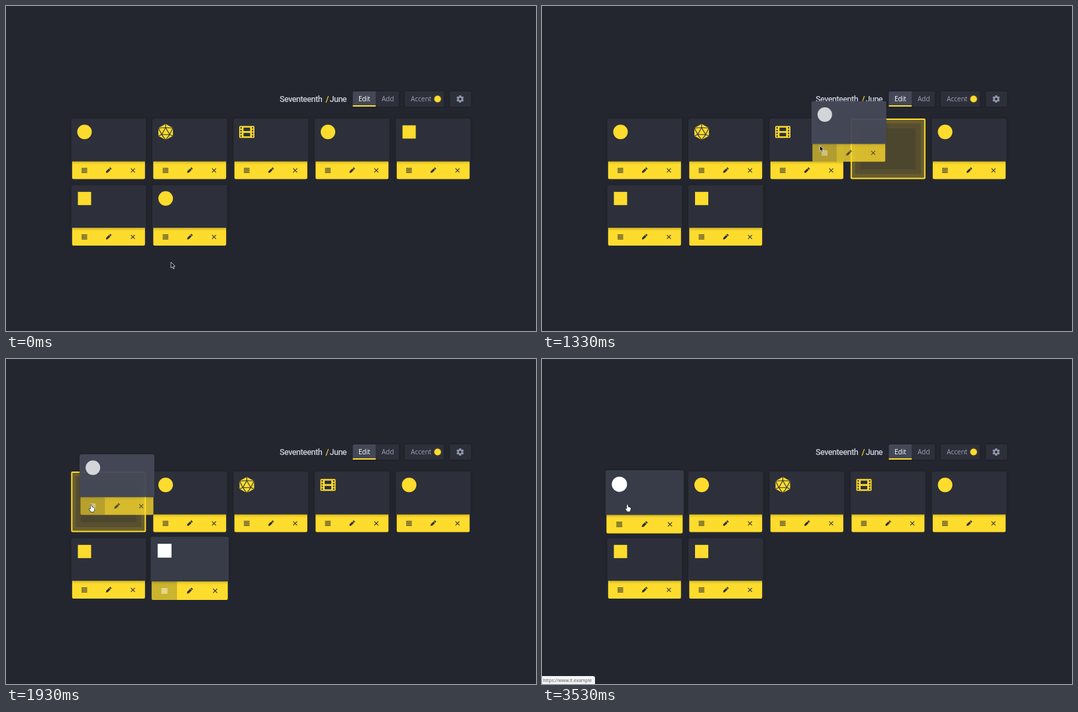
An HTML page with a canvas that plays this animation: 800x491 px, repeating every 3.59 s.

```html
<!DOCTYPE html>
<html lang="en">
<head>
<meta charset="utf-8">
<title>Start page tiles</title>
<style>
html, body { margin: 0; width: 100%; height: 100%; overflow: hidden; background: #24262f; }
canvas { display: block; width: 800px; height: 491px; }
</style>
</head>
<body>
<canvas id="stage" width="800" height="491"></canvas>
<script>
const ctx = document.getElementById('stage').getContext('2d');
const LOOP = 3590;
const BG = '#24262f', BODY = '#2d303a', INK = '#30312e';
const YELLOW = [254, 220, 46], WHITE = [255, 255, 255];
const ACCENT = rgb(YELLOW);
const UI = '"Open Sans", "Noto Sans", sans-serif';
const TILE = { w: 113, h: 91.5, body: 64.5, bar: 27 };

// Timeline in ms
const GRAB = 680, DROP = 1975, STATUS = 2240, LAG = 30;
const cursorKeys = [
  [0, 249, 387], [70, 249, 387], [400, 240, 347], [680, 240, 347],
  [1000, 354, 334], [1190, 470, 258], [1300, 425, 220], [1330, 420, 211],
  [1560, 224, 176], [1670, 156, 191], [1900, 129, 220], [LOOP, 129, 220]
];
const holeMoves = [[GRAB, 6], [1160, 3], [1400, 2], [1500, 1], [1635, 0]];

function rgb(c) { return `rgb(${c.map(Math.round).join(',')})`; }
function mix(a, b, k) { return rgb(a.map((v, i) => v + (b[i] - v) * k)); }
function ramp(t, start, length) {
  const k = Math.min(1, Math.max(0, (t - start) / length));
  return k * k * (3 - 2 * k);
}

// Smooth path through timed points
function cursorAt(t) {
  let i = 0;
  while (i < cursorKeys.length - 2 && t >= cursorKeys[i + 1][0]) i++;
  const a = cursorKeys[i], b = cursorKeys[i + 1];
  const before = cursorKeys[i - 1] || a, after = cursorKeys[i + 2] || b;
  const span = b[0] - a[0], u = Math.min(1, Math.max(0, (t - a[0]) / span));
  return [1, 2].map(d => {
    const ma = (b[d] - before[d]) / (b[0] - before[0]) * span;
    const mb = (after[d] - a[d]) / (after[0] - a[0]) * span;
    const u2 = u * u, u3 = u2 * u;
    return (2 * u3 - 3 * u2 + 1) * a[d] + (u3 - 2 * u2 + u) * ma +
           (3 * u2 - 2 * u3) * b[d] + (u3 - u2) * mb;
  });
}

function box(x, y, w, h, color, radius = 0) {
  ctx.fillStyle = color;
  ctx.beginPath();
  ctx.roundRect(x, y, w, h, radius);
  ctx.fill();
}

function disc(x, y, r, color) {
  ctx.fillStyle = color;
  ctx.beginPath();
  ctx.arc(x, y, r, 0, Math.PI * 2);
  ctx.fill();
}

function trace(points, close) {
  ctx.beginPath();
  points.forEach(p => ctx.lineTo(p[0], p[1]));
  if (close) ctx.closePath();
}

function text(str, x, y, font, color) {
  ctx.font = font;
  ctx.fillStyle = color;
  ctx.fillText(str, x, y);
}

const icons = {
  round(color) { disc(0, 0, 11, color); },
  square(color) { box(-10, -10, 20, 20, color); },
  dice(color) {
    const rim = [[0, -12], [11, -6], [11, 6], [0, 12], [-11, 6], [-11, -6]];
    const top = [0, -6.5], left = [-6, 4], right = [6, 4];
    trace(rim, true);
    ctx.fillStyle = color;
    ctx.fill();
    ctx.strokeStyle = BODY;
    ctx.lineWidth = 1.1;
    trace([top, left, right], true);
    ctx.stroke();
    const spokes = [[top, 5], [top, 0], [top, 1], [right, 1], [right, 2], [right, 3],
                    [left, 3], [left, 4], [left, 5]];
    spokes.forEach(([from, i]) => { trace([from, rim[i]]); ctx.stroke(); });
  },
  film(color) {
    box(-11.5, -9, 23, 18, color, 1.5);
    for (const x of [-9.8, 7.6])
      for (let i = 0; i < 4; i++) box(x, -7.2 + i * 4.1, 2.2, 2.2, BODY);
    box(-5, -6.6, 10, 5.2, BODY);
    box(-5, 1.4, 10, 5.2, BODY);
  }
};

function grip(x, y, color) {
  for (let i = 0; i < 4; i++) box(x - 4.3, y - 3.6 + i * 2.1, 8.6, 1.1, color);
}

function pencil(x, y) {
  ctx.save();
  ctx.translate(x, y);
  ctx.rotate(-Math.PI / 4);
  ctx.fillStyle = INK;
  trace([[-5.6, 0], [-3.4, -1.6], [2.4, -1.6], [2.4, 1.6], [-3.4, 1.6]], true);
  ctx.fill();
  box(3.1, -1.6, 2, 3.2, INK, .6);
  ctx.restore();
}

function cross(x, y) {
  ctx.strokeStyle = INK;
  ctx.lineWidth = 1.1;
  for (const s of [-1, 1]) {
    trace([[x - 3, y - 3 * s], [x + 3, y + 3 * s]]);
    ctx.stroke();
  }
}

function slotAt(i) { return [98.3 + (i % 5) * 122.5, 170 + Math.floor(i / 5) * 100.5]; }

function tile([x, y], icon, look = {}) {
  const { hover = 0, press = 0, ghost = false } = look;
  const scale = 1 + .045 * hover;
  ctx.save();
  ctx.translate(x + TILE.w / 2, y + TILE.h / 2);
  ctx.scale(scale, scale);
  ctx.translate(-TILE.w / 2, -TILE.h / 2);

  ctx.globalAlpha = ghost ? .78 : 1;
  box(1.5, TILE.body, 110, TILE.bar, ACCENT, [0, 0, 2, 2]);
  if (press) box(1.5, TILE.body, 36.7, TILE.bar, `rgba(35,37,46,${.22 * press})`, [0, 0, 0, 2]);
  grip(20, 78.3, mix([48, 49, 46], [250, 246, 225], press));
  pencil(56.5, 78.3);
  cross(93.2, 78.3);

  ctx.globalAlpha = ghost ? .95 : 1;
  ctx.save();
  ctx.shadowColor = `rgba(0,0,0,${ghost ? .15 : .35})`;
  ctx.shadowBlur = 4;
  ctx.shadowOffsetY = 1;
  box(0, 0, TILE.w, TILE.body, ghost ? '#454958' : mix([45, 48, 58], [55, 60, 72], hover), [3, 3, 0, 0]);
  ctx.restore();

  ctx.translate(20.2, 20.3);
  icons[icon](ghost ? '#dcdde0' : mix(YELLOW, WHITE, hover));
  ctx.restore();
}

function dropHole([x, y]) {
  box(x, y, TILE.w, TILE.h, ACCENT, 2);
  box(x + 2, y + 2, 109, 87.5, '#695e2f');
  box(x + 7, y + 7.5, 99, 76.5, '#574f2f');
  box(x + 14.5, y + 15, 84, 61.5, '#4d462f');
}

function header() {
  const title = '500 12.5px Roboto, "Open Sans", sans-serif';
  ctx.letterSpacing = '-0.5px';
  text('Seventeenth', 413, 145.3, title, '#c9cedb');
  text('/', 482.5, 145.3, title, ACCENT);
  text('June', 488.5, 145.3, title, '#c9cedb');
  ctx.letterSpacing = '0px';
  ctx.save();
  ctx.shadowColor = 'rgba(0,0,0,.25)';
  ctx.shadowBlur = 3;
  box(523.5, 129, 69.5, 23, BODY, 2);
  box(602, 129, 59, 23, BODY, 2);
  box(670, 129, 32, 23, BODY, 2);
  ctx.restore();
  box(523.5, 129, 34.5, 23, '#434756', [2, 0, 0, 2]);
  box(523.5, 150, 34.5, 2, ACCENT);
  const label = '10px ' + UI;
  text('Edit', 532, 144, label, '#ffffff');
  text('Add', 567, 144, label, '#9aa1b5');
  text('Accent', 611, 144, label, '#9aa1b5');
  disc(651.5, 140.5, 6, '#4f4932');
  disc(651.5, 140.5, 5, ACCENT);
  gear(685.5, 140.5);
}

function gear(x, y) {
  ctx.save();
  ctx.translate(x, y);
  for (let i = 0; i < 6; i++) {
    ctx.rotate(Math.PI / 3);
    box(-1.5, -5.6, 3, 3, '#9299ad', .5);
  }
  disc(0, 0, 4.2, '#9299ad');
  disc(0, 0, 1.9, BODY);
  ctx.restore();
}

function arrow(x, y) {
  ctx.save();
  ctx.translate(x, y);
  trace([[0, 0], [0, 8.6], [2, 6.9], [3.5, 10], [5, 9.3], [3.6, 6.3], [6.2, 6.1]], true);
  ctx.fillStyle = '#08090b';
  ctx.fill();
  ctx.strokeStyle = '#f0f0f0';
  ctx.lineWidth = .8;
  ctx.stroke();
  ctx.restore();
}

function hand(x, y) {
  ctx.save();
  ctx.translate(x, y);
  trace([[-1, 0], [.4, .2], [1.1, 3.4], [3.8, 4.2], [5.2, 5.4], [4.6, 8], [3.8, 10.4],
         [-.4, 10.4], [-3, 6.6], [-2.6, 5.6], [-.7, 6.5]], true);
  ctx.lineJoin = 'round';
  ctx.strokeStyle = '#15161a';
  ctx.lineWidth = 1.2;
  ctx.stroke();
  ctx.fillStyle = '#ffffff';
  ctx.fill();
  ctx.restore();
}

function statusBar(alpha) {
  ctx.globalAlpha = alpha;
  box(0, 479, 80, 12, '#f4f4f5', [0, 3, 0, 0]);
  text('https://www.it.example', 1.5, 487.7, '6.8px ' + UI, '#55585e');
  ctx.globalAlpha = 1;
}

function draw(t) {
  const dragging = t >= GRAB && t < DROP;
  const others = ['round', 'dice', 'film', 'round', 'square', 'square'];
  const passed = holeMoves.filter(m => t >= m[0]);
  const home = passed.length ? passed[passed.length - 1][1] : 6;
  const order = [...others.slice(0, home), 'moved', ...others.slice(home)];

  const firstHover = ramp(t, 300, 140);
  const lastHover = ramp(t, 2070, 140);
  const leftover = ramp(t, 1390, 140) * (1 - ramp(t, 2050, 140));

  box(0, 0, 800, 491, BG);
  header();
  order.forEach((icon, i) => {
    const place = slotAt(i);
    if (icon !== 'moved') tile(place, icon, i === 6 ? { hover: leftover, press: leftover } : {});
    else if (dragging) dropHole(place);
    else if (t < GRAB) tile(place, 'round', { hover: firstHover, press: firstHover });
    else tile(place, 'round', { hover: lastHover });
  });

  if (dragging) {
    const [gx, gy] = cursorAt(Math.max(GRAB, t - LAG));
    tile([gx - 18, gy - 76], 'round', { press: 1, ghost: true });
  }
  if (t >= STATUS) statusBar(ramp(t, STATUS, 120));

  const pointing = (t >= 330 && t < GRAB) || t >= 1600;
  (pointing ? hand : arrow)(...cursorAt(t));
}

const start = performance.now();
function tick() {
  draw((performance.now() - start) % LOOP);
  requestAnimationFrame(tick);
}
draw(0);
requestAnimationFrame(tick);
</script>
</body>
</html>
```
